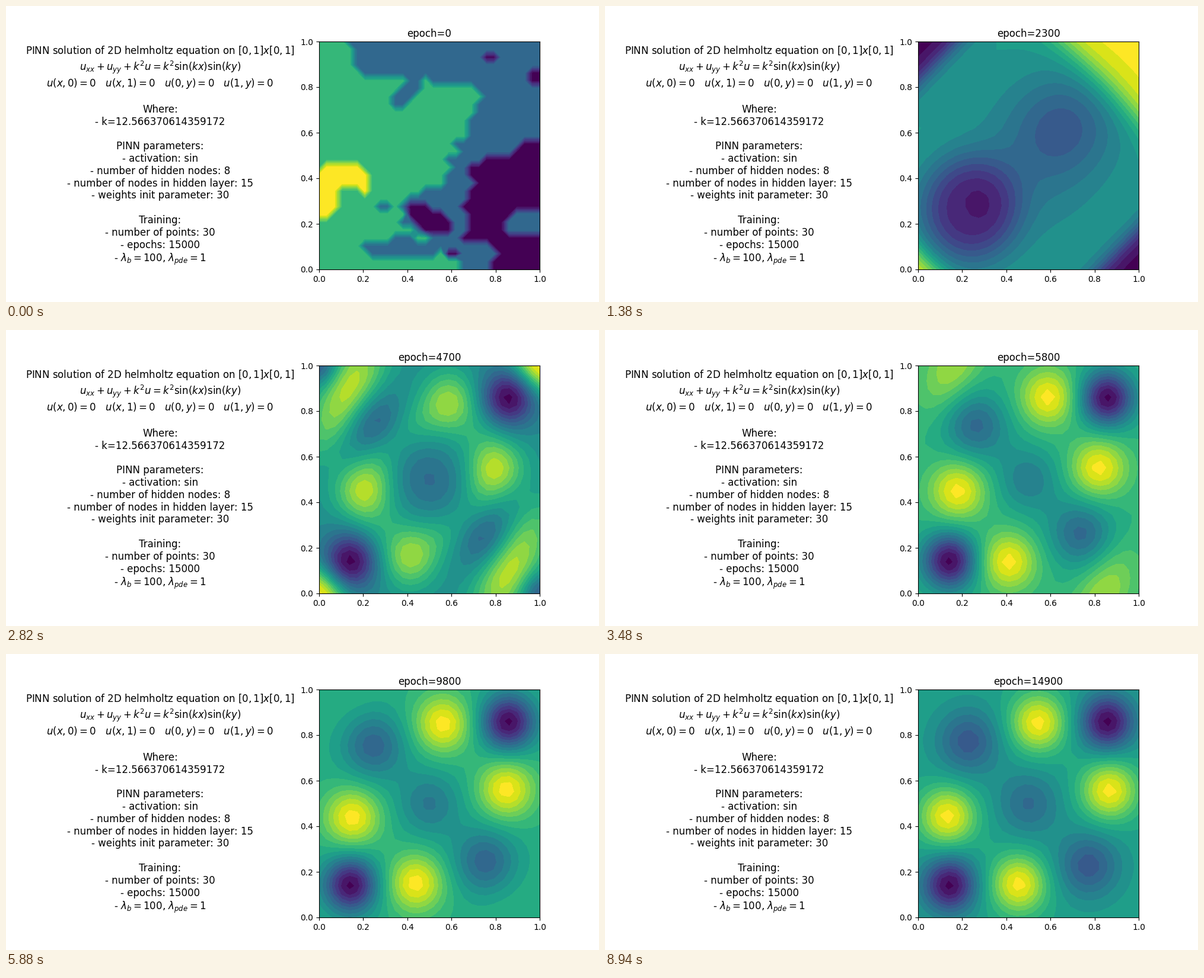
Write a matplotlib script that moves like this. It is 1000 px wide and 500 px high and loops after 9 s.

```python
from itertools import product

import numpy as np
import matplotlib.pyplot as plt
from matplotlib.animation import FuncAnimation

FRAMES, INTERVAL, EPOCH_STEP = 150, 60, 100
N, BANDS = 30, 18

axis = np.linspace(0, 1, N)
X, Y = np.meshgrid(axis, axis)
S, D = X + Y, X - Y
LEVELS = (np.arange(BANDS + 2) - 0.5) / BANDS

INFO = "\n".join([
    r"PINN solution of 2D helmholtz equation on $[0,1]x[0,1]$",
    r"$u_{xx} + u_{yy} + k^2 u = k^2 \sin(kx)\sin(ky)$",
    r"$u(x,0)=0 \quad u(x,1)=0 \quad u(0,y)=0 \quad u(1,y)=0$",
    "",
    "Where:",
    f"- k={4 * np.pi}",
    "",
    "PINN parameters:",
    "- activation: sin",
    "- number of hidden nodes: 8",
    "- number of nodes in hidden layer: 15",
    "- weights init parameter: 30",
    "",
    "Training:",
    "- number of points: 30",
    "- epochs: 15000",
    r"- $\lambda_{b}=100$, $\lambda_{pde}=1$",
])


def radius(x, y, rx, ry, angle=0):
    """Elliptical distance of every node from (x, y)."""
    a = np.radians(angle)
    p = (X - x) * np.cos(a) + (Y - y) * np.sin(a)
    q = (Y - y) * np.cos(a) - (X - x) * np.sin(a)
    return np.hypot(p / rx, q / ry)


def bump(x, y, rx, ry, angle=0):
    return np.exp(-0.5 * radius(x, y, rx, ry, angle) ** 2)


def ramp(z, mid, width):
    return 0.5 * (1 + np.tanh((z - mid) / width))


def twin(u):
    """Add the copy turned half round the centre."""
    return u + u[::-1, ::-1]


def normalise(u):
    return (u - u.min()) / (u.max() - u.min())


def mix(a, b, w):
    return a + (b - a) * w


def untrained():
    """Nearly constant output, rounded to four distinct values."""
    jitter = np.random.default_rng(4).normal(0, 0.012, (N, 1))
    upper = np.interp(Y, (0, .12, .2, .33, .38, .5, .6, .79, .84, .87),
                      (.66, .55, .37, .4, .56, .6, .68, .73, .4, .16))
    lower = np.interp(Y, (0, .12, .14, .45, .58), (.78, .78, .66, .68, 1))
    u = np.where(X > upper + jitter, 1.0, 2.0)
    u[(X > lower + jitter) & (Y < .57)] = 0
    for value, *blob in [
            (1, .38, .095, .19, .045), (1, .40, .78, .10, .04, 45),
            (0, .50, .22, .13, .05, -30), (1, .95, .20, .10, .06),
            (0, .78, .93, .03, .02), (0, .99, .85, .04, .04),
            (0, .60, .07, .03, .02), (1, .29, .275, .03, .02),
            (3, .11, .37, .125, .105), (2, .13, .30, .08, .055),
            (3, .03, .28, .06, .05)]:
        u[radius(*blob) < 1] = value
    return u / 3


def smooth(u, width=0.1):
    k = np.exp(-0.5 * ((axis[:, None] - axis) / width) ** 2)
    k /= k.sum(axis=1, keepdims=True)
    return k @ u @ k.T


def early():
    corners = (.47 * ramp(S, 1.66, .11) + .44 * ramp(-S, -.08, .08)
               - .55 * ramp(abs(D), .82, .08))
    pit = .42 * np.exp(-radius(.23, .26, .23, .24) ** 3)
    valley = .22 * bump(.67, .64, .17, .16) + .12 * bump(.5, .42, .22, .22)
    return .55 + corners - pit - valley


def ringed():
    r = radius(.5, .5, .29, .235, 52)
    side = (radius(.5, .5, 9, .235, 52) / (r + .2)) ** 2
    ring = (.16 + .13 * side) * np.exp(-((r - 1) / .42) ** 2)
    half = (.42 * bump(.11, .83, .19, .08, 55) + .68 * bump(0, 0, .07, .10, 45)
            - .32 * bump(0, 1, .06, .06))
    return .28 + ring + .05 * bump(.5, .5, .1, .1) + twin(half)


def lattice(base, spread, skew, edge):
    """Three by three wells and peaks, stretched along the diagonals."""
    u = base + edge * twin(bump(.16, 1, .15, .08, 60))
    for i, j in product((-1, 0, 1), repeat=2):
        s = np.interp(i + j, range(-2, 3), (-.715, -.41, 0, .41, .715))
        s *= 1 + skew * (j * j - i * i)
        d = np.interp(i - j, range(-2, 3), (-.545, -.31, 0, .31, .545)) * spread
        if (i + j) % 2:
            amp, size = .97 - base, .088
        elif i * j == 1:
            amp, size = -base, .085
        else:
            amp, size = -.21 - .08 * abs(i), .102
        u = u + amp * bump((1 + s + d) / 2, (1 + s - d) / 2, size, size)
    return u


# base level, spread across the diagonal, skew, edge spot
FORMING = np.array([.62, .87, .10, .22])
SETTLING = np.array([.60, .93, .00, .02])
SETTLED = np.array([.55, 1.0, -.03, .00])

ROUGH = untrained()
STAGES = [normalise(u) for u in
          (smooth(ROUGH), early(), ringed(), lattice(*FORMING))]
TIMES = [0, 23, 36, 58]
SETTLE_AT = 98


def field(i):
    if i == 0:
        return ROUGH
    for k in range(3):
        if i < TIMES[k + 1]:
            w = (i - TIMES[k]) / (TIMES[k + 1] - TIMES[k])
            return normalise(mix(STAGES[k], STAGES[k + 1], w))
    if i < SETTLE_AT:
        w = (i - TIMES[-1]) / (SETTLE_AT - TIMES[-1])
        return normalise(lattice(*mix(FORMING, SETTLING, w)))
    w = (i - SETTLE_AT) / (FRAMES - 1 - SETTLE_AT)
    return normalise(lattice(*mix(SETTLING, SETTLED, 1 - (1 - w) ** 2)))


fig = plt.figure(figsize=(10, 5), dpi=100)
fig.text(.26, .495, INFO, ha="center", va="center", fontsize=12)
ax = fig.add_axes([.528, .11, .372, .77])
ax.set(xlim=(0, 1), ylim=(0, 1))
title = ax.set_title("epoch=0")


def update(i):
    for old in list(ax.collections):
        old.remove()
    ax.contourf(X, Y, field(i), levels=LEVELS, cmap="viridis", vmin=0, vmax=1)
    title.set_text(f"epoch={i * EPOCH_STEP}")
    return [title, *ax.collections]


anim = FuncAnimation(fig, update, frames=FRAMES, interval=INTERVAL,
                     init_func=lambda: update(0), repeat=True)
plt.show()
```
